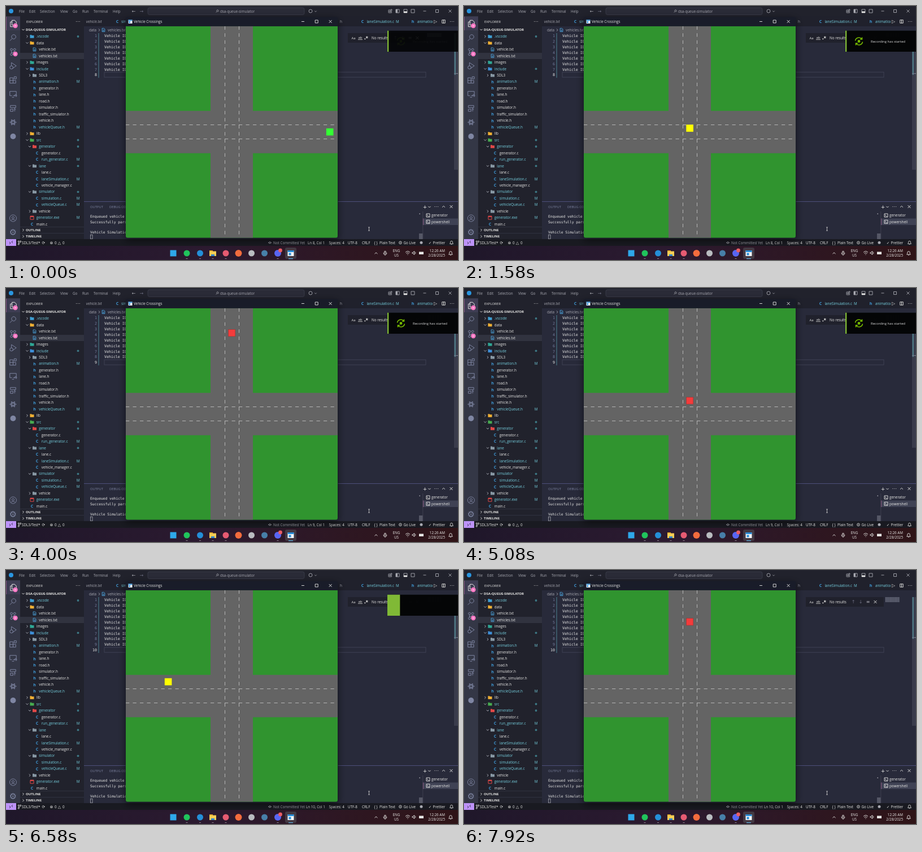
An HTML page with a canvas that plays this animation: 800x450 px, repeating every 8000 ms.

```html
<!DOCTYPE html>
<html lang="en">
<head>
<meta charset="utf-8">
<title>Crossing animation</title>
<style>
html, body { margin: 0; width: 100%; height: 100%; overflow: hidden; background: #191a21; }
canvas { display: block; }
</style>
</head>
<body>
<canvas id="stage" width="800" height="450"></canvas>
<script>
const ctx = document.getElementById('stage').getContext('2d');
const LOOP = 8000;
const UI = '"Open Sans", "Noto Sans", sans-serif';
const MONO = '"DejaVu Sans Mono", "Noto Sans Mono", monospace';
const SYMBOL = '"DejaVu Sans", sans-serif';
const WHITE = '#e8e8e6', GREY = '#a9aab2', DIM = '#6f7185', CYAN = '#76d0df', BLUE = '#3f9bd8';

function rect(x, y, w, h, color) {
  ctx.fillStyle = color;
  ctx.fillRect(x, y, w, h);
}
function disc(x, y, r, color) {
  ctx.fillStyle = color;
  ctx.beginPath();
  ctx.arc(x, y, r, 0, 7);
  ctx.fill();
}
function text(str, x, y, color = WHITE, { size = 6.3, font = UI, style = '', align = 'left' } = {}) {
  ctx.font = `${style} ${size}px ${font}`;
  ctx.textAlign = align;
  ctx.fillStyle = color;
  ctx.fillText(str, x, y + size * 0.35);
}
function symbol(str, x, y, color = GREY, size = 8) {
  text(str, x, y, color, { size, font: SYMBOL, align: 'center' });
}
// Strokes an SVG path whose origin is the icon centre.
function stroke(path, x, y, color = GREY, width = 0.9, scale = 1) {
  ctx.save();
  ctx.translate(x, y);
  ctx.scale(scale, scale);
  ctx.strokeStyle = color;
  ctx.lineWidth = width / scale;
  ctx.stroke(new Path2D(path));
  ctx.restore();
}
const SHAPES = {
  close: 'M-2.5-2.5 2.5 2.5M2.5-2.5-2.5 2.5',
  minimise: 'M-2.5 0H2.5',
  box: 'M-2.5-2.5H2.5V2.5H-2.5Z',
  right: 'M-1.1-2.1 1 0-1.1 2.1',
  down: 'M-2.1-1.1 0 1 2.1-1.1',
  up: 'M-2.5 1.2 0-1.2 2.5 1.2',
  ring: 'M-3 0A3 3 0 1 1 3 0A3 3 0 1 1-3 0',
  lens: 'M-1.5 1.5A4 4 0 1 1 1.5 2.5A4 4 0 0 1-1.5 1.5L-6 6',
  files: 'M-2-6H3L6-3V3H-2ZM-2-3H-5V6H3V3',
  branch: 'M-3-2V3M3-2Q3 1-3 2M-5-4A2 2 0 1 1-1-4A2 2 0 1 1-5-4M1-4A2 2 0 1 1 5-4A2 2 0 1 1 1-4M-5 5A2 2 0 1 1-1 5A2 2 0 1 1-5 5',
  bug: 'M-3-6 6 0-1 5M-3-6V0M-6 3A3 3 0 1 1 0 3A3 3 0 1 1-6 3',
  blocks: 'M-6-4H0V6H-6ZM-6 1H5V6H0M2-6H6V-2H2Z',
  screen: 'M-6-5H6V3H0M-6-5V3H-2M-2 6H2M3 4A2 2 0 1 1 5 5',
  flow: 'M-5-5H5V-1H-5ZM-5 2H0V6H-5ZM2 2H5M3-1V6',
  atom: 'M-6 0Q0-5 6 0Q0 5-6 0M-3-5Q4-2 3 5Q-4 2-3-5M3-5Q-4-2-3 5Q4 2 3-5',
  person: 'M-6 0A6 6 0 1 1 6 0A6 6 0 1 1-6 0M-2-1A2 2 0 1 1 2-1A2 2 0 1 1-2-1M-4 4Q0 0 4 4',
  doc: 'M-2.4-3H1L2.4-1.5V3H-2.4ZM-1.2 0H1.2M-1.2 1.5H1.2',
  terminal: 'M-3-3H3V3H-3ZM-1.8-1.3-.4 0-1.8 1.3M.2 1.6H1.8',
  split: 'M-2.5-2.5H2.5V2.5H-2.5ZM0-2.5V2.5',
  bell: 'M-3 2H3L2 .5V-1A2 2 0 0 0-2-1V.5ZM-.8 3H.8'
};
function icon(name, x, y, color, width, scale) {
  stroke(SHAPES[name], x, y, color, width, scale);
}
function folder(x, y, color) {
  rect(x - 3.5, y - 2.8, 3, 1.5, color);
  rect(x - 3.5, y - 1.9, 7, 4.7, color);
}
function clipped(x, y, w, h, draw, radius = 0) {
  ctx.save();
  ctx.beginPath();
  ctx.roundRect(x, y, w, h, radius);
  ctx.clip();
  draw();
  ctx.restore();
}

// Each row: indent level, name, kind or folder colour, open state, git mark.
const YELLOW = '#f2b134', SLATE = '#8797a3';
const TREE = [
  [0, '.vscode', '#3e9fd3', 0, '●'], [0, 'data', YELLOW, 1], [1, 'vehicle.txt', 'doc'],
  [1, 'vehicles.txt', 'doc'], [0, 'images', '#2fa795', 0], [0, 'include', '#3e8fd8', 1, '●'],
  [1, 'SDL3', SLATE, 0], [1, 'animation.h', 'h', 0, 'M'], [1, 'generator.h', 'h'], [1, 'lane.h', 'h'],
  [1, 'road.h', 'h'], [1, 'simulator.h', 'h'], [1, 'traffic_simulator.h', 'h'], [1, 'vehicle.h', 'h'],
  [1, 'vehicleQueue.h', 'h', 0, 'M'], [0, 'lib', YELLOW, 0], [0, 'src', '#47ad50', 1, '●'],
  [1, 'generator', '#e04848', 1, '●'], [2, 'generator.c', 'C'], [2, 'run_generator.c', 'C', 0, 'M'],
  [1, 'lane', SLATE, 1, '●'], [2, 'lane.c', 'C'], [2, 'laneSimulation.c', 'C', 0, 'M'],
  [2, 'vehicle_manager.c', 'C'], [1, 'simulator', SLATE, 1, '●'], [2, 'simulation.c', 'C', 0, 'M'],
  [2, 'vehicleQueue.c', 'C', 0, 'M'], [1, 'vehicle', SLATE, 0], [0, 'generator.exe', 'exe', 0, 'M'],
  [0, 'main.c', 'C']
];

function drawTitleBar() {
  rect(0, 0, 800, 18, '#21222c');
  disc(9, 9, 4, '#2a96e0');
  const menu = { File: 23, Edit: 41, Selection: 60, View: 96, Go: 118, Run: 135, Terminal: 155, Help: 189 };
  for (const [label, x] of Object.entries(menu)) text(label, x, 9.3, GREY);
  symbol('←', 226, 9);
  symbol('→', 240, 9, DIM);
  ctx.fillStyle = '#2a2b37';
  ctx.strokeStyle = '#3d3f4d';
  ctx.lineWidth = 0.8;
  ctx.beginPath();
  ctx.roundRect(251, 3, 277, 12.5, 3);
  ctx.fill();
  ctx.stroke();
  icon('lens', 374, 9, GREY, 0.8, 0.4);
  text('dsa-queue-simulator', 379, 9.3, GREY);
  icon('ring', 539, 9);
  icon('down', 548, 9.5, GREY, 0.8, 0.8);
  icon('blocks', 680, 9, GREY, 0.8, 0.5);
  for (const x of [693, 707, 720]) icon('box', x, 9, GREY, 0.9, 1.2);
  rect(690, 6, 3, 6, GREY);
  rect(704, 9.5, 6, 2.5, WHITE);
  icon('minimise', 741, 9);
  icon('box', 763, 9);
  icon('close', 786, 9);
}

function drawActivityBar() {
  rect(0, 18, 25, 395, '#343746');
  rect(0, 19, 25, 24, 'rgba(189,147,249,.07)');
  rect(0, 19, 0.7, 24, 'rgba(255,121,198,.5)');
  const names = ['files', 'lens', 'branch', 'bug', 'blocks', 'screen', 'flow', 'atom'];
  names.forEach((name, i) => icon(name, 12.5, 31 + i * 25, i ? '#7f86a3' : WHITE, 1, 0.95));
  disc(12.5, 231, 5, '#7f86a3');
  icon('person', 12.5, 376, '#7f86a3');
  symbol('⚙', 12.5, 401, '#7f86a3', 15);
  for (const y of [35, 85]) {
    disc(16.5, y, 4.2, '#ff79c6');
    rect(15, y - 0.4, 3, 0.9, '#fff');
  }
}

function drawSidebar() {
  rect(25, 18, 113, 395, '#21222c');
  text('EXPLORER', 36, 27.5, WHITE, { size: 6 });
  symbol('⋯', 127, 27.5, WHITE);
  icon('down', 30.5, 42, WHITE);
  text('DSA-QUEUE-SIMULATOR', 35, 42.3, WHITE, { size: 6, style: 'bold' });
  rect(25, 83, 113, 11, '#31333f');
  TREE.forEach(([level, name, kind, open, mark], i) => {
    const y = 54 + i * 11.47, x = 46 + level * 4.5;
    const isFolder = kind[0] === '#';
    if (isFolder) {
      icon(open ? 'down' : 'right', x - 8.5, y, '#b8bac4');
      folder(x, y, kind);
    } else if (kind === 'doc') {
      icon('doc', x, y, '#4ba3dc');
    } else if (kind === 'exe') {
      icon('box', x, y, '#e04848', 1, 1.2);
      rect(x - 3, y - 3, 6, 1.8, '#e04848');
    } else {
      text(kind, x, y, BLUE, { size: 7, style: 'bold', align: 'center' });
    }
    text(name, x + 7.8, y, mark ? CYAN : WHITE);
    if (mark === 'M') text('M', 127.5, y, CYAN, { align: 'center' });
    else if (mark) disc(127.5, y, 1.9, '#3d7884');
  });
  [['OUTLINE', 397], ['TIMELINE', 408.2]].forEach(([label, y]) => {
    rect(25, y - 5.7, 113, 0.6, '#3b3d4c');
    icon('right', 30.5, y, WHITE);
    text(label, 35, y, WHITE, { size: 6, style: 'bold' });
  });
}

function drawEditor(line) {
  rect(138, 18, 662, 395, '#282a3a');
  rect(138, 18, 662, 18, '#20212c');
  text('vehicle.txt', 142, 27.5, GREY, { style: 'italic' });
  text('C', 197, 27.5, BLUE, { size: 7, style: 'bold', align: 'center' });
  text('simulation.c', 204, 27.5, CYAN);
  text('h', 591, 27.5, GREY);
  text('C', 631, 27.5, BLUE, { size: 7, style: 'bold', align: 'center' });
  text('laneSimulation.c', 638.5, 27.5, CYAN);
  text('M', 690, 27.5, CYAN);
  text('h', 720, 27.5, BLUE, { size: 7, style: 'bold', align: 'center' });
  clipped(727, 18, 28, 18, () => text('animation.h', 728, 27.5, CYAN));
  symbol('▷', 760, 27.5, WHITE);
  icon('split', 774.5, 27.5, WHITE, 0.9, 1.1);
  symbol('⋯', 789, 27.5, WHITE);
  text('data', 147, 42.5, GREY);
  icon('right', 165, 42.5);
  icon('doc', 172.5, 42.5, '#4ba3dc');
  text('vehicles.txt', 180, 42.5, GREY);

  for (let i = 1; i <= line; i++) {
    const y = 42.7 + i * 9.93;
    text(i, 161, y, i === line ? WHITE : '#747c9d', { size: 6.6, font: MONO, align: 'right' });
    if (i < line) text('Vehicle ID', 174, y, WHITE, { size: 6.6, font: MONO });
  }
  const top = 37.7 + line * 9.93;
  rect(163.5, 48, 1, top - 38, '#4d8391');
  ctx.strokeStyle = '#44475a';
  ctx.lineWidth = 0.8;
  ctx.strokeRect(174, top, 569, 9);

  rect(605, 48, 138, 17, '#20212c');
  text('Aa', 611.5, 56.5, WHITE, { size: 6 });
  text('ab', 623.5, 56, WHITE, { size: 6 });
  rect(623, 59.3, 8, 0.7, WHITE);
  rect(634.5, 57.5, 1.7, 1.7, WHITE);
  stroke('M0-2V2M-1.8-1 1.8 1M1.8-1-1.8 1', 638.8, 55.5, WHITE);
  text('No results', 647, 56.7);
  symbol('↑', 689, 56.5, DIM);
  symbol('↓', 702, 56.5, DIM);
  symbol('≡', 715, 56.5, GREY);
  icon('close', 728, 56.5, WHITE);
  for (let x = 746; x < 771; x += 1.8) rect(x, 48, 1, line - 1, '#777b8b');
  rect(793, 48, 7, 242 - (line - 8) * 7, '#3a3c4c');
  rect(793.5, 48, 2.5, 74, '#4d7784');
  rect(793, 119, 7, 1.2, '#777b8b');
}

function drawPanel() {
  rect(138, 346, 662, 67, '#282a3a');
  rect(138, 346, 662, 0.8, '#57598a');
  text('OUTPUT', 149, 356, '#7f86a3', { size: 5.8 });
  text('DEBUG CONSOLE', 183, 356, '#7f86a3', { size: 5.8 });
  const mono = { size: 6.3, font: MONO };
  text('Enqueued vehicle', 149, 373, WHITE, mono);
  text('Successfully parsed', 149, 382.3, WHITE, mono);
  text('Vehicle Simulation', 149, 400.5, WHITE, mono);
  ctx.strokeStyle = GREY;
  ctx.lineWidth = 0.8;
  ctx.strokeRect(149.5, 405.3, 3.5, 7.5);
  symbol('+', 741.5, 355.5, WHITE, 9);
  icon('down', 749.5, 356, WHITE);
  symbol('⋯', 761.5, 355.5, WHITE);
  icon('up', 774.5, 355.5, WHITE);
  icon('close', 788, 355.5, WHITE);
  rect(737.5, 364, 0.7, 49, '#464858');
  rect(738, 376.5, 62, 11.5, '#3f4254');
  rect(738, 376.5, 0.7, 11.5, 'rgba(255,121,198,.5)');
  icon('terminal', 747, 371, WHITE);
  icon('terminal', 747, 382.3, WHITE);
  text('generator', 753, 371);
  text('powershell', 753, 382.3);
  rect(731, 403, 6.5, 10, '#555766');
  rect(731.5, 367.5, 1.5, 1.5, GREY);
  stroke('M-1.5-3H1.5M0-3V3M-1.5 3H1.5', 642.5, 395, WHITE, 0.7);
}

function drawStatusBar(line) {
  rect(0, 413, 800, 12, '#191a21');
  rect(0, 413, 18, 12, '#bd93f9');
  stroke('M-3-1-1 1-3 3M3-3 1-1 3 1', 9, 419, '#282a36');
  icon('branch', 24, 419.3, WHITE, 0.8, 0.55);
  text('SDL3/Test*', 28, 419.3);
  symbol('⟳', 66.5, 419.3, WHITE, 7);
  symbol('⊗', 80.5, 419.3, WHITE, 7);
  text('0', 86, 419.3);
  symbol('△', 94.5, 419.3, WHITE, 7);
  text('0', 100, 419.3);
  stroke('M-3 0H-1.5M1.5 0H3M-1.5 0A1.5 1.5 0 1 1 1.5 0A1.5 1.5 0 1 1-1.5 0', 467, 419.3, GREY);
  text('Not Committed Yet', 473, 419.3, GREY);
  const items = [[`Ln ${line}, Col 1`, line > 9 ? 531 : 534], ['Spaces: 4', 571.5], ['UTF-8', 605],
    ['CRLF', 630], ['{ }', 651.5], ['Plain Text', 661], ['Go Live', 703.5], ['Prettier', 755.5]];
  for (const [label, x] of items) text(label, x, 419.3);
  icon('ring', 698, 419.3, WHITE, 0.8, 0.8);
  disc(698, 419.3, 0.8, WHITE);
  disc(735, 419.3, 2.5, GREY);
  symbol('✓', 750.5, 419.3, WHITE, 6.5);
  icon('bell', 788.5, 419.3, WHITE, 0.8);
}

function drawTaskbar() {
  const shade = ctx.createLinearGradient(0, 0, 800, 0);
  shade.addColorStop(0, '#1f172a');
  shade.addColorStop(0.45, '#2c1a30');
  shade.addColorStop(1, '#2f1417');
  rect(0, 425, 800, 25, shade);
  rect(290.5, 432.5, 11, 11, '#2ea8ea');
  disc(320, 438, 5.5, '#20c45c');
  disc(343.5, 438, 5.5, '#248fd8');
  rect(360, 433, 6, 3, '#e3a320');
  rect(360, 434.5, 12, 8.5, '#f7cd55');
  rect(363, 440, 6, 3, '#3487ce');
  disc(389, 438, 5.5, '#e65b72');
  disc(411.5, 438, 6, '#f36c3d');
  disc(434.5, 438, 5.5, '#b9bcc0');
  disc(457.5, 438, 5.5, '#477fa8');
  disc(481, 438, 6, '#5865f2');
  disc(485.5, 433, 3.4, '#e95d65');
  ctx.fillStyle = '#433943';
  ctx.beginPath();
  ctx.roundRect(494, 428, 20, 20, 3);
  ctx.fill();
  rect(498.5, 433, 11, 10, '#f3f5f7');
  rect(498.5, 433, 11, 3, '#268cd8');
  rect(500.5, 437.5, 4, 4, '#268cd8');
  for (const x of [320, 343.5, 366, 389, 481]) rect(x - 1.5, 447, 3, 1, '#90858f');
  rect(500, 447, 8, 1.2, '#62b7e7');
  icon('up', 655, 438, WHITE);
  stroke('M-1.2-3.5H1.2V0H-1.2ZM-2.8-1V0A2.8 2.5 0 0 0 2.8 0V-1M0 2.5V4', 671, 438, WHITE);
  text('ENG', 691, 433.7, WHITE, { align: 'center' });
  text('US', 691, 442, WHITE, { align: 'center' });
  stroke('M-4-1Q0-5 4-1M-2.5 1Q0-1.5 2.5 1M-.6 3H.6', 711, 437.5, WHITE);
  stroke('M-3-1H-1.5L0.5-3V3L-1.5 1H-3ZM2-2Q4 0 2 2', 722, 437.5, WHITE);
  rect(731, 435.5, 8, 4.5, WHITE);
  text('12:26 AM', 777, 433.5, WHITE, { align: 'right' });
  text('2/28/2025', 777, 441.8, WHITE, { align: 'right' });
  icon('bell', 787, 438, WHITE, 0.9, 1.1);
}

const FIELD = { x: 212, y: 35.8, size: 375 };

function drawField() {
  const { x, y, size } = FIELD;
  rect(x, y, size, size, '#30942f');
  rect(x + 150, y, 75, size, '#646464');
  rect(x, y + 150, size, 75, '#646464');
  ctx.strokeStyle = '#d0d0d0';
  ctx.lineWidth = 0.75;
  ctx.setLineDash([6.25, 6.25]);
  ctx.beginPath();
  for (const lane of [175, 200]) {
    ctx.moveTo(x + lane + 0.5, y);
    ctx.lineTo(x + lane + 0.5, y + size);
    ctx.moveTo(x, y + lane - 0.3);
    ctx.lineTo(x + size, y + lane - 0.3);
  }
  ctx.stroke();
  ctx.setLineDash([]);
}

function drawWindow() {
  ctx.save();
  ctx.shadowColor = 'rgba(0,0,0,.55)';
  ctx.shadowBlur = 14;
  ctx.shadowOffsetY = 4;
  ctx.fillStyle = '#191c29';
  ctx.beginPath();
  ctx.roundRect(211.5, 19.5, 376, 391.5, 4);
  ctx.fill();
  ctx.restore();
  rect(216.5, 24.5, 7, 6.5, '#f2f4f6');
  rect(216.5, 24.5, 7, 1.7, '#268cd8');
  rect(217.5, 27.2, 2.5, 2.7, '#268cd8');
  text('Vehicle Crossings', 226, 27.8);
  icon('minimise', 525.5, 27.5, WHITE);
  icon('box', 549.7, 27.5, WHITE);
  icon('close', 574.2, 27.5, WHITE);
  clipped(FIELD.x, FIELD.y, FIELD.size, FIELD.size, drawField, [0, 0, 3.5, 3.5]);
}

const MIDDLE = 399.6, WEST_LANE = 198;

function car(x, y, color, outline) {
  rect(x - 6.3, y - 6.3, 12.6, 12.6, color);
  if (!outline) return;
  ctx.strokeStyle = outline;
  ctx.lineWidth = 0.7;
  ctx.strokeRect(x - 6.2, y - 6.2, 12.4, 12.4);
}
const redCar = y => car(MIDDLE, y, '#f43b3b', '#8d3c3c');

// Drives north to the west-bound lane, then turns left.
function yellowCar(elapsed) {
  const y = 216.6 - elapsed * 0.1135;
  car(MIDDLE - Math.max(0, WEST_LANE - y), Math.max(WEST_LANE, y), '#ffff00');
}

function drawCars(t) {
  const { x, y, size } = FIELD;
  clipped(x, y, size, size, () => {
    if (t < 1120) car(573.3 - t * 0.111, 223.1, '#33ff33');
    else if (t < 3500) yellowCar(t - 1580);
    else if (t < 5125) redCar(79.5 + (t - 4000) / 9);
    else if (t < 7340) yellowCar(t - 5426);
    else redCar(91.7 + (t - 7920) / 9);
  });
}

const ramp = (t, from, to) => Math.min(1, Math.max(0, (t - from) / (to - from)));

function drawNotice(t) {
  if (t > 6950) return;
  const slide = 125 * ramp(t, 6670, 6950) ** 2;
  const bar = 2.3 + 20 * ramp(t, 6420, 6580);
  clipped(675, 43.5, 125, 37.5, () => {
    ctx.save();
    ctx.translate(slide, 0);
    rect(675, 43.5, 125, 37.5, `rgba(4,5,6,${0.9 + 0.08 * ramp(t, 0, 400)})`);
    ctx.globalAlpha = (0.06 + 0.94 * ramp(t, 80, 600)) * (1 - ramp(t, 6350, 6500));
    stroke('M-6.5-1A6.5 6.5 0 0 1 5-4M6.5 1A6.5 6.5 0 0 1-5 4M5.5-7V-3.5H2M-5.5 7V3.5H-2', 699, 62.5, '#76b900', 1.6);
    disc(699, 62.5, 2.4, '#76b900');
    text('Recording has started', 720, 62.6, '#dedede', { size: 6 });
    ctx.globalAlpha = 1;
    rect(675, 43.5, bar, 37.5, '#80b936');
    ctx.restore();
  });
}

function draw(t) {
  const line = t < 2950 ? 8 : t < 6300 ? 9 : 10;
  drawEditor(line);
  drawPanel();
  drawTitleBar();
  drawActivityBar();
  drawSidebar();
  drawStatusBar(line);
  drawTaskbar();
  drawWindow();
  drawCars(t);
  drawNotice(t);
}

const start = performance.now();
function tick() {
  draw((performance.now() - start) % LOOP);
  requestAnimationFrame(tick);
}
tick();
</script>
</body>
</html>
```
